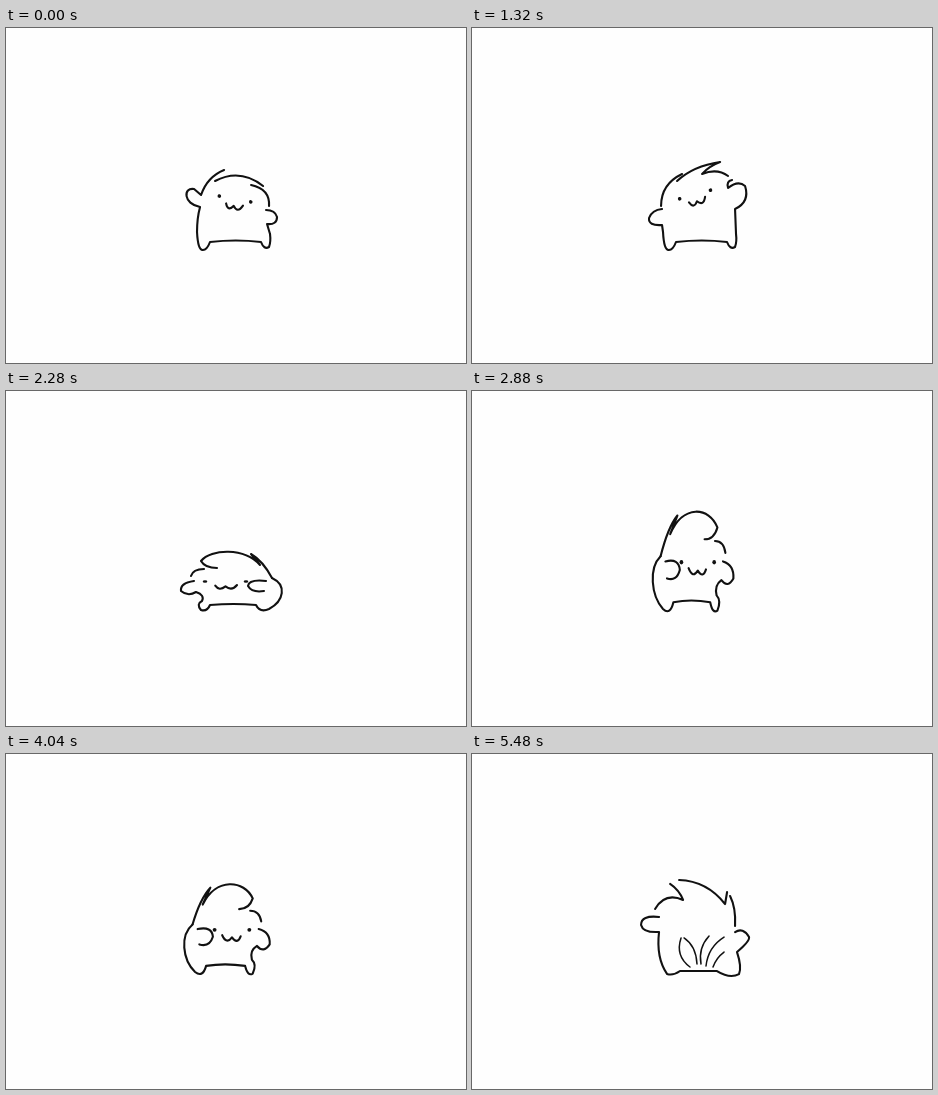
These frames come from a looping animation (460 px wide and 335 px high, 5520 ms). An HTML page without scripts:

```html
<!DOCTYPE html>
<html lang="en">
<head>
<meta charset="utf-8">
<title>Dancing doodle</title>
<style>
/* one loop is 23 beats of 240 ms; every motion is a formula of --beat */
@property --beat { syntax: "<number>"; inherits: true; initial-value: 0; }
@keyframes count { to { --beat: 23; } }

html, body { margin: 0; width: 100%; height: 100%; overflow: hidden; background: #fefefe; }
svg {
  display: block; width: 460px; height: 335px;
  animation: count 5520ms linear infinite;
  --lean: cos(var(--beat) * 180deg - 45deg);
  --swing: sin(var(--beat) * 360deg);
  --side: clamp(-1, sin(var(--beat) * 180deg + 1deg) * -9999, 1);
}
g { transform-origin: 223px 218px; }
path { fill: none; stroke: #111; stroke-width: 2.1; stroke-linecap: round; stroke-linejoin: round; vector-effect: non-scaling-stroke; }
.thin { stroke-width: 1.5; }

/* which dance is on */
.wave { opacity: calc((5.99 - var(--beat)) * 9999); }
.squat { opacity: calc(min(var(--beat) - 5.99, 16.99 - var(--beat)) * 9999); }
.bang { opacity: calc((var(--beat) - 16.99) * 9999); }

/* lean to one side, then to the other */
.right { opacity: calc(var(--lean) * 9999); transform: skewX(calc((0.707 - var(--lean)) * 8deg)); }
.left { opacity: calc(var(--lean) * -9999); transform: skewX(calc((-0.707 - var(--lean)) * 8deg)); }

/* squash on the beat, change sides at full stretch */
.flip { transform: scaleX(var(--side)); }
.stretch { transform: scale(calc(0.9 + 0.1 * cos(var(--beat) * 360deg + 180deg)), calc(1.35 + 0.35 * cos(var(--beat) * 360deg))); }

/* head down, head up */
.down { opacity: calc((var(--swing) + 0.01) * 9999); transform: rotate(calc(var(--swing) * 5deg)); }
.up { opacity: calc((var(--swing) + 0.01) * -9999); transform: rotate(calc((var(--swing) + 0.866) * 5deg)); }
.mirror { transform: scaleX(-1); }
</style>
</head>
<body>
<svg viewBox="0 0 460 335">
  <defs>
    <g id="face">
      <circle cx="-16" r="1.8" fill="#111"/>
      <circle cx="16" r="1.8" fill="#111"/>
      <path d="M-8 6Q-5 14 0 7Q5 14 9 5"/>
    </g>
    <path id="feet" d="M191 204Q192 223 197 222Q201 222 204 214Q230 211 255 214Q258 222 263 219Q265 214 264 206"/>
  </defs>

  <g class="wave">
    <g class="right">
      <use href="#feet"/>
      <use href="#face" transform="translate(229 171) rotate(10.6)"/>
      <path d="M191 204Q191 190 194 179C177 176 177 159 188 161L195 167Q201 149 218 142"/>
      <path d="M209 153Q234 140 257 158M245 157Q264 161 263 178"/>
      <path d="M260 182Q269 182 271 189Q271 197 261 196L264 206"/>
    </g>
    <g class="left">
      <use href="#feet"/>
      <use href="#face" transform="translate(223 166.5) rotate(-15.7)"/>
      <path d="M191 204L190 197Q176 198 177 190Q180 182 190 181M189 178Q189 156 210 146"/>
      <path d="M205 153Q221 138 248 134Q237 138 230 146Q245 140 256 148"/>
      <path d="M260 152Q254 153 256 160Q266 152 273 158Q278 174 263 181L264 206"/>
    </g>
  </g>

  <g class="flip">
    <g class="squat"><g class="stretch">
      <use href="#face" transform="translate(219.5 190.5) scale(1.28 .7)"/>
      <path d="M211 177Q199 177 195 170C205 158 238 156 254 174L245 163Q257 170 266 187"/>
      <path d="M198 178Q187 178 185 185M188 190Q174 192 175 200Q182 206 190 201Q199 204 196 210Q190 213 195 219Q201 221 204 214Q228 212 250 214Q254 222 263 218C278 210 281 194 266 187"/>
      <path d="M260 190Q243 188 242 195Q246 202 258 200"/>
    </g></g>

    <g class="bang">
      <g class="down">
        <path d="M203 149Q228 137 250 154M245 145L255 158M250 152L263 160M194 168L200 167M195 162Q203 149 217 160"/>
        <path d="M264 163Q272 151 280 156Q284 165 269 174M270 177Q280 198 271 219Q261 226 261 210"/>
        <path d="M193 183Q178 188 180 195L191 196Q190 206 191 216Q195 226 201 220L206 211M207 218Q238 223 254 214Q267 201 255 187"/>
        <path class="thin" d="M238 202Q247 198 255 187M253 192L250 203L255 205Q252 212 243 215"/>
      </g>
      <g class="mirror"><g class="up">
        <path d="M207 126Q235 127 253 150L255 138M258 142Q264 154 263 172M198 130Q207 136 211 146Q193 138 183 155"/>
        <path d="M187 163Q169 161 169 171Q171 179 187 178Q184 204 195 220Q201 222 208 217H245Q258 225 267 220Q270 213 265 198Q278 187 277 183Q271 173 263 178"/>
        <path class="thin" d="M209 184Q203 202 218 213M212 184Q224 192 225 210M237 182Q226 194 229 210M252 183Q236 193 234 212M252 198Q244 204 241 213"/>
      </g></g>
    </g>
  </g>
</svg>
</body>
</html>
```
